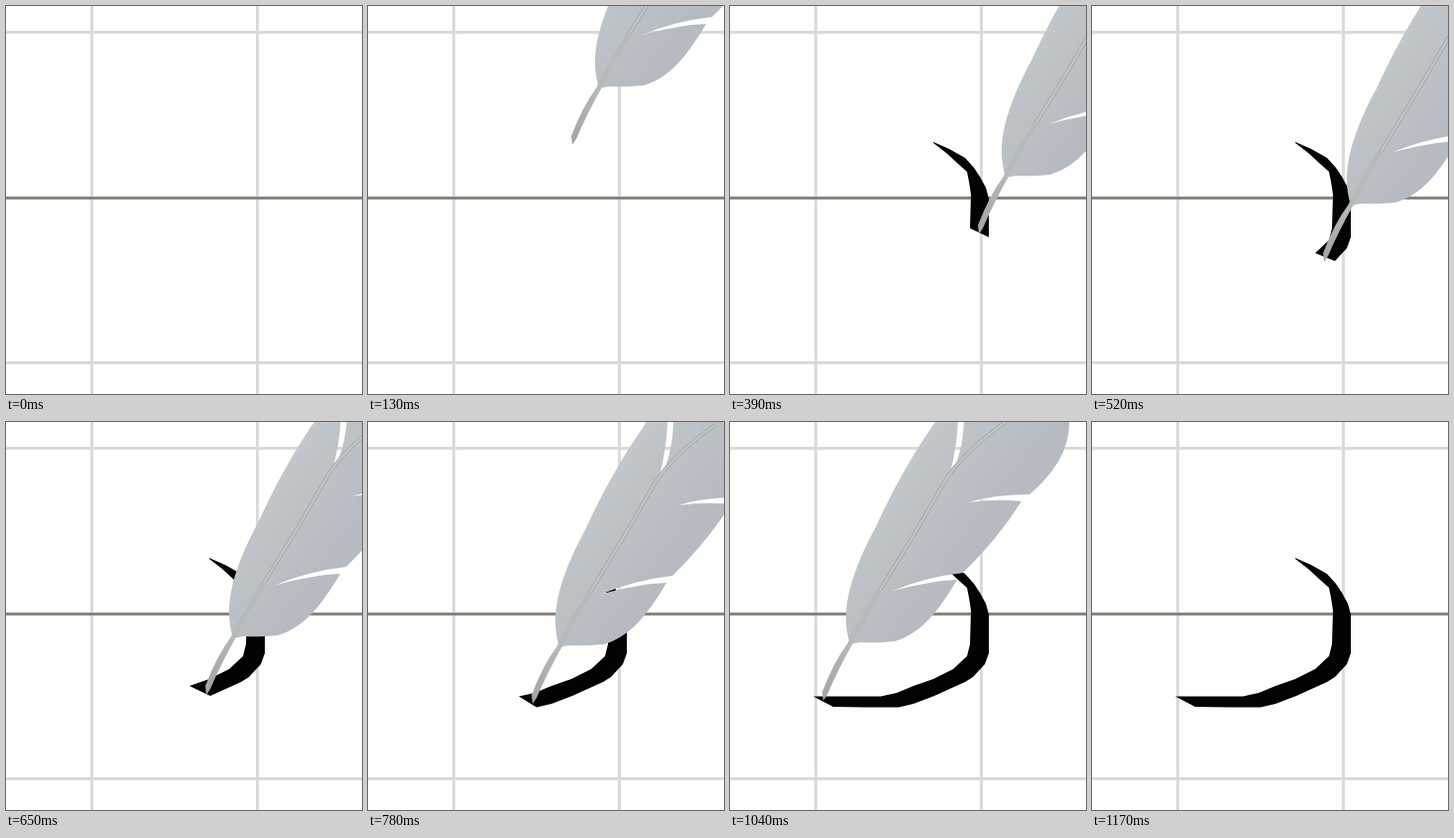
Animation of 359x391 px, one loop 1.82 s. Source, as an HTML page:

```html
<!DOCTYPE html>
<html lang="en">
<head>
<meta charset="utf-8">
<title>Pen stroke</title>
<style>
  html, body { margin: 0; width: 100%; height: 100%; overflow: hidden; background: #fefefc; }
  svg { display: block; width: 100vw; height: 100vh; }
</style>
</head>
<body>
<svg viewBox="0 0 359 391">
  <defs>
    <linearGradient id="vane" gradientUnits="userSpaceOnUse" x1="145" y1="60" x2="235" y2="130">
      <stop offset="0" stop-color="#c3c9cc"/>
      <stop offset=".5" stop-color="#bbc1c5"/>
      <stop offset="1" stop-color="#b5bbc0"/>
    </linearGradient>
    <linearGradient id="quill" gradientUnits="userSpaceOnUse" x1="95" y1="280" x2="124" y2="218">
      <stop offset="0" stop-color="#a3a5a5"/>
      <stop offset="1" stop-color="#b7baba"/>
    </linearGradient>
  </defs>
  <path d="M86.5 0V391M253.5 0V391M0 26.5H359M0 359.5H359" stroke="#dadada" stroke-width="3"/>
  <path d="M0 193.5H359" stroke="#8a8483" stroke-width="3"/>
  <path id="ink" fill="#030402"/>
  <g id="feather" fill="none">
    <path fill="url(#vane)" d="M121 224 C116 208 116 192 119 177 C123 156 133 131 147 106
      C159 80 178 41 207 0 L211 -8 H230 Q230 22 221 55 Q236 32 236 -8 H342
      Q344 18 331 40 Q320 58 302 73 Q266 73 241 81 Q268 77 294 80
      Q269 119 235 152 Q198 156 163 170.500 Q202 160 229 159
      Q218 178 205 194 Q187 215 166 221 Q145 223 131 222 Z"/>
    <path stroke="#a4a9ac" stroke-width="4" d="M122 221 Q134 197 151 170 L184 116 Q201 87 217 59 Q235 31 278 0"/>
    <path stroke="#c3c7c8" stroke-width="2" d="M122 221 Q134 197 151 170 L184 116 Q201 87 217 59 Q235 31 278 0"/>
    <path fill="url(#quill)" d="M94 281 L93 272 Q105 241 118 224 Q132 194 150 169 L153 170
      Q137 198 125 221 Q109 249 98 275 Z"/>
  </g>
</svg>
<script>
  const STEP = 130, LOOP = 1820;
  const ink = document.getElementById('ink');
  const feather = document.getElementById('feather');

  // Per step: feather offset, then points added to the outer and inner edge of the stroke
  const steps = [
    { at: [112, -141], outer: [[205, 137]], inner: [[205, 138]] },
    { at: [147, -113], outer: [[221, 144], [237, 153], [246, 163], [252, 172]],
      inner: [[218, 148], [230, 159], [239, 167]] },
    { at: [157, -51], outer: [[258, 183], [261, 194], [261, 233]],
      inner: [[241, 177], [243, 190], [242, 224]] },
    { at: [140, -23], outer: [[257, 244], [245, 257]], inner: [[239, 236], [225, 249]] },
    { at: [108, -6], outer: [[237, 262], [206, 276]], inner: [[205, 259], [185, 266]] },
    { at: [72, 3], outer: [[185, 284], [170, 287.500]], inner: [[168, 273], [152, 276.500]] },
    { at: [37, 3], outer: [[137, 287.500]], inner: [[118, 276.500]] },
    { at: [0, 0], outer: [[104, 287]], inner: [[84, 276.500]] }
  ];

  function strokePath(count) {
    const done = steps.slice(0, count);
    const outer = done.flatMap(s => s.outer);
    const inner = done.flatMap(s => s.inner).reverse();
    return count > 1 ? 'M' + outer.concat(inner).join('L') + 'Z' : '';
  }

  let shown = -1;
  function draw(now) {
    const count = Math.floor((now % LOOP) / STEP);
    if (count !== shown) {
      shown = count;
      const step = steps[count - 1];
      ink.setAttribute('d', strokePath(count));
      feather.setAttribute('visibility', step ? 'visible' : 'hidden');
      if (step) feather.setAttribute('transform', `translate(${step.at})`);
    }
  }

  const start = performance.now();
  function tick() {
    draw(performance.now() - start);
    requestAnimationFrame(tick);
  }
  tick();
</script>
</body>
</html>
```
